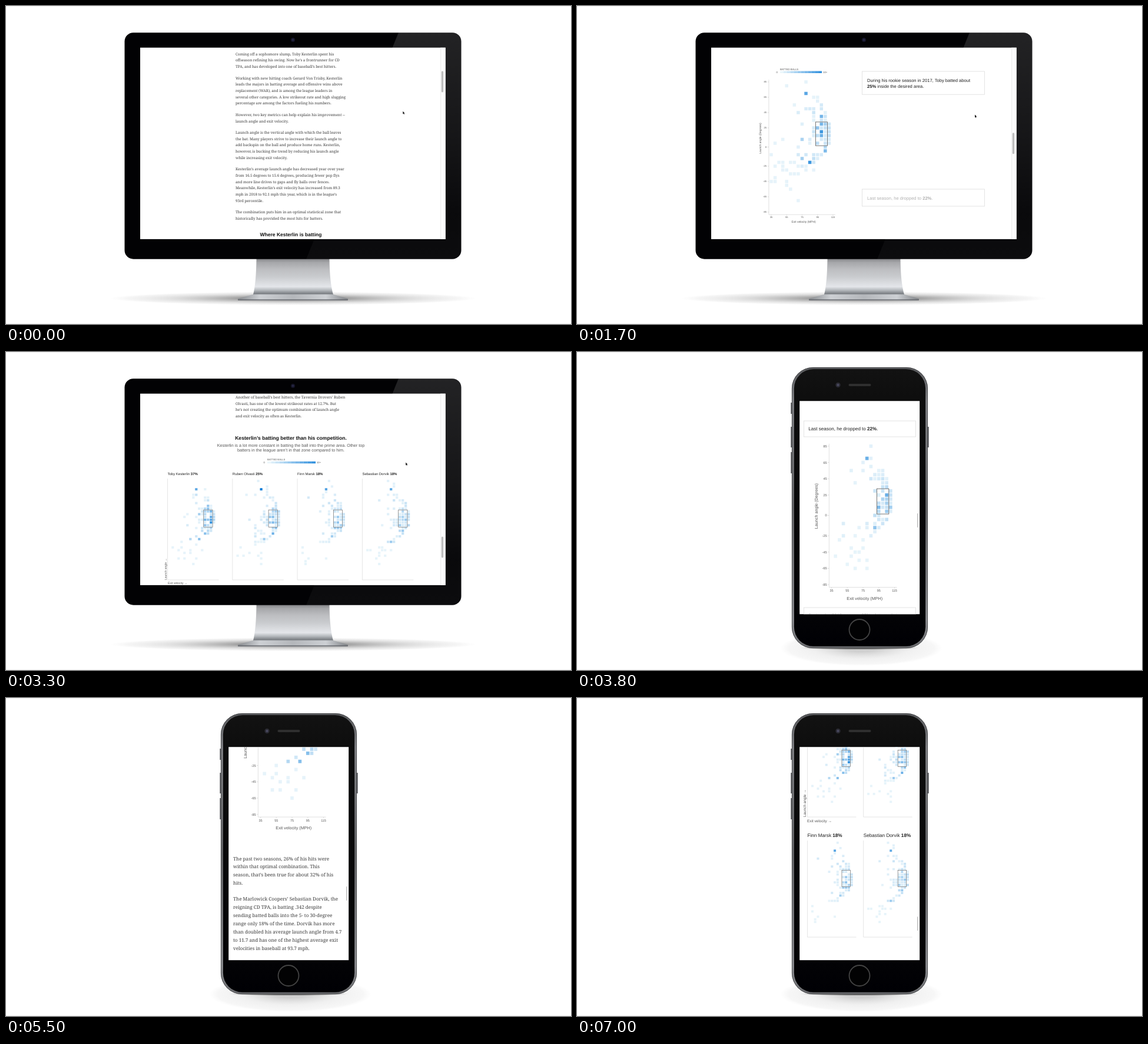
An HTML page for the animation above (7.1 s loop, 960 px wide and 540 px high).

```html
<!DOCTYPE html>
<html lang="en">
<head>
<meta charset="utf-8">
<title>Batting story</title>
<style>
  html, body { margin: 0; width: 100%; height: 100%; overflow: hidden; background: #fff; }
  svg { display: block; width: 960px; height: 540px; text-rendering: geometricPrecision; }
  text { font-family: "Liberation Sans", Arial, sans-serif; fill: #222; white-space: pre; }
  .serif { font-family: "Noto Serif", Georgia, serif; fill: #3a3a3a; }
  .soft { fill: #555; }
  .head { font-weight: 700; fill: #111; }
</style>
</head>
<body>
<svg id="stage" viewBox="0 0 960 540"></svg>
<script>
const LOOP = 7100, STEP = 100, CUT = 3600;

// ---------- helpers ----------
const clamp = v => Math.max(0, Math.min(1, v));
const range = (a, b) => Array.from({ length: b - a + 1 }, (_, i) => a + i);
const rng = seed => () => (seed = seed * 16807 % 2147483647) / 2147483647;

function at(keys, t) {
  let i = 1;
  while (i < keys.length - 1 && t > keys[i][0]) i++;
  const [t0, v0] = keys[i - 1], [t1, v1] = keys[i];
  return v0 + (v1 - v0) * clamp((t - t0) / (t1 - t0));
}

const bold = s => s.replace(/\*(.+?)\*/g, '<tspan font-weight="700">$1</tspan>');
const txt = (x, y, size, s, attr = '') =>
  `<text x="${x}" y="${y}" font-size="${size}" ${attr}>${bold(s)}</text>`;
const rect = (x, y, w, h, attr) =>
  `<rect x="${x}" y="${y}" width="${w}" height="${h}" ${attr}/>`;
const line = (x1, y1, x2, y2, color, w = .6) =>
  `<path d="M${x1} ${y1}L${x2} ${y2}" stroke="${color}" stroke-width="${w}"/>`;
const stops = list => list.map(([o, c, a = 1]) =>
  `<stop offset="${o}" stop-color="${c}" stop-opacity="${a}"/>`).join('');
const grad = (id, dir, list) => `<linearGradient id="${id}" ${dir}>${stops(list)}</linearGradient>`;
const radial = (id, list) => `<radialGradient id="${id}">${stops(list)}</radialGradient>`;

function paras(list, x, y, size, pitch, gap) {
  let out = '';
  for (const p of list) {
    for (const l of p) { out += txt(x, y, size, l, 'class="serif"'); y += pitch; }
    y += gap - pitch;
  }
  return out;
}

// ---------- batted ball data: [column, row, level] ----------
function makeData(seed, fill, far, hot) {
  const rand = rng(seed), map = {};
  const put = (c, r, v) => { map[c + ':' + r] = [c, r, v]; };
  for (const r of range(-5, 12)) {
    const edge = 15.6 - ((r - 3) / (r > 3 ? 5 : 3.6)) ** 2;
    for (const c of range(3, Math.floor(edge))) {
      const d = edge - c;
      const p = fill / (1 + Math.exp((d - 5 + Math.abs(r - 3) * .5) / 1.3)) + .03;
      const heat = Math.exp(-(((d - 2) / 2.2) ** 2) - ((r - 3) / 4.5) ** 2);
      const roll = rand(), lift = rand();
      if (roll < p) put(c, r, .03 + .13 * lift * lift + heat * (.08 + .38 * lift * lift));
    }
  }
  if (typeof far === 'number') {
    for (let i = 0; i < far; i++) {
      const r = -5 - Math.floor(rand() * 9);
      put(1 + Math.floor(rand() * 9), r, .02);
    }
    for (const r of range(11, 17)) if (rand() < .6) put(8 + Math.floor(rand() * 4), r, .05);
  } else far.forEach(([c, r]) => put(c, r, .03));
  hot.forEach(([c, r, v]) => put(c, r, v));
  return Object.values(map);
}

const rookie = makeData(4021, .92, [
  [9, 17], [4, 16], [11, 13], [12, 13], [6, 11], [1, -8], [0, -9], [1, -9], [4, -9], [4, -10],
  [5, -11], [7, -14], [1, -5], [2, -4], [3, -4], [3, -5], [3, -6], [4, -6], [5, -4], [5, -7],
  [6, -7], [7, -7], [9, -6], [11, -6], [6, -4], [7, -5], [1, 1], [3, 2], [0, -2]
], [[9, 14, .8], [13, 4, .95], [10, -4, .95], [13, 3, .7], [13, 8, .65], [14, -1, .6], [13, 6, .65], [8, -3, .4], [12, 5, .5], [8, 2, .35]]);
const second = makeData(977, .8, 16, [[9, 14, .7], [12, 2, .6], [14, 5, .7], [11, -3, .5]]);
const latest = makeData(6203, .85, [
  [1, -7], [4, -7], [3, -8], [7, -8], [11, -8], [5, -9], [7, -9], [3, -11], [5, -11], [9, -11],
  [8, -13], [9, -6], [12, 14], [8, 12], [8, 11], [5, 4], [6, 5]
], [[9, 14, .75], [9, 12, .2], [14, 2, 1], [14, 3, .8], [14, 4, .75], [14, 6, .65], [13, 7, .5], [13, 8, .5],
    [12, 3, .65], [12, -2, .55], [10, -4, .55], [7, -4, .3], [12, 1, .5], [10, 5, .4]]);
const players = [
  ['Toby Kesterlin *37%*', latest],
  ['Ruben Olvasti *25%*', makeData(31337, 1, 12, [[9, 14, 1.2], [13, -2, .7], [13, 2, .6], [14, 0, .5], [12, 4, .45], [10, -4, .45]])],
  ['Finn Marsk *18%*', makeData(8081, .9, 7, [[9, 14, .8], [11, -3, .4], [14, 1, .35]])],
  ['Sebastian Dorvik *18%*', makeData(5150, .9, 13, [[9, 14, .75], [13, -1, .45], [9, -5, .45], [14, 3, .45]])]
];

// ---------- charts ----------
const tint = v => {
  const a = [235, 246, 251], b = [52, 146, 222];
  return `rgb(${a.map((n, i) => Math.round(n + (b[i] - n) * v))})`;
};

const cells = (data, { x, y, px, py }) => data.map(([c, r, v]) =>
  rect((x + (c - .42) * px).toFixed(2), (y - (r + .42) * py).toFixed(2), (px * .84).toFixed(2),
    (py * .84).toFixed(2), `fill="${tint(v)}"`)).join('');

const zone = ({ x, y, px, py }, w) => rect(x + 11.5 * px, y - 6.55 * py, 3.05 * px, 6.2 * py,
  `fill="none" stroke="#555" stroke-width="${w}"`);

function legend(x, y, w, size) {
  const n = 12, bar = range(0, n - 1).map(i =>
    rect(x + i * w / n, y + 1.8, w / n + .1, 3.5, `fill="${tint(i / (n - 1))}"`)).join('');
  return txt(x, y, size, 'BATTED BALLS', 'class="soft"') + bar +
    txt(x - 6.5, y + 5, size, '0', 'class="soft"') + txt(x + w + 2, y + 5, size, '10+', 'class="soft"');
}

// The pinned chart, with one layer of cells per season
function mainChart(name, g, tick, title, turnX) {
  const { x, y, px, py } = g, left = x - .62 * px, base = y + 17.65 * py;
  let out = line(left, y - 17.6 * py, left, base, '#ccc') + line(left, base, x + 16.6 * px, base, '#ccc');
  for (const deg of [85, 65, 45, 25, 0, -25, -45, -65, -85]) {
    const ty = y - deg / 5 * py;
    out += line(left - 2.5, ty, left, ty, '#ccc') +
      txt(left - 3.8, ty + tick * .36, tick, String(deg), 'text-anchor="end" class="soft"');
  }
  for (const mph of [35, 55, 75, 95, 115]) {
    const tx = x + (mph - 35) / 5 * px;
    out += line(tx, base, tx, base + 2, '#ccc') +
      txt(tx, base + tick * 1.42, tick, String(mph), 'text-anchor="middle" class="soft"');
  }
  const mid = { x: x + 8.4 * px, y: y - 2.3 * py };
  out += txt(mid.x, base + title * 2.9, title, 'Exit velocity (MPH)', 'text-anchor="middle" class="soft"') +
    txt(0, 0, title, 'Launch angle (Degrees)',
      `text-anchor="middle" class="soft" transform="translate(${turnX} ${mid.y}) rotate(-90)"`);
  [rookie, second, latest].forEach((d, i) => { out += `<g id="${name}Data${i}">${cells(d, g)}</g>`; });
  return out + zone(g, .8);
}

function smallChart([label, data], x, top, k, size) {
  const g = { x: x + 3.8 * k, y: top + 83.9 * k, px: 5 * k, py: 4.7 * k }, low = top + 172 * k;
  return txt(x, top - 5.8, size, label) + line(x, top, x, low, '#d4d4d4') +
    line(x, low, x + 87 * k, low, '#d4d4d4') + cells(data, g) + zone(g, .6);
}

const arrows = (x, low, size) =>
  txt(x, low + size * 1.35, size, 'Exit velocity →', 'class="soft"') +
  txt(0, 0, size, 'Launch angle →', `class="soft" transform="translate(${x - 2.5} ${low}) rotate(-90)"`);

const stepBox = (id, s, o) =>
  rect(o.x, s.top, o.w, o.pad + o.pitch * s.lines.length, 'fill="#fff" stroke="#ddd" stroke-width=".8"') +
  `<g id="${id}">` + s.lines.map((l, i) =>
    txt(o.x + o.inset, s.top + o.first + i * o.pitch, o.size, l)).join('') + '</g>';

// ---------- page text ----------
const intro = [
  ['Coming off a sophomore slump, Toby Kesterlin spent his',
   'offseason refining his swing. Now he’s a frontrunner for CD',
   'TPA, and has developed into one of baseball’s best hitters.'],
  ['Working with new hitting coach Gerard Von Trisby, Kesterlin',
   'leads the majors in batting average and offensive wins above',
   'replacement (WAR), and is among the league leaders in',
   'several other categories. A low strikeout rate and high slugging',
   'percentage are among the factors fueling his numbers.'],
  ['However, two key metrics can help explain his improvement --',
   'launch angle and exit velocity.'],
  ['Launch angle is the vertical angle with which the ball leaves',
   'the bat. Many players strive to increase their launch angle to',
   'add backspin on the ball and produce home runs. Kesterlin,',
   'however, is bucking the trend by reducing his launch angle',
   'while increasing exit velocity.'],
  ['Kesterlin’s average launch angle has decreased year over year',
   'from 16.5 degrees to 15.6 degrees, producing fewer pop flys',
   'and more line drives to gaps and fly balls over fences.',
   'Meanwhile, Kesterlin’s exit velocity has increased from 89.3',
   'mph in 2018 to 92.1 mph this year, which is in the league’s',
   '93rd percentile.'],
  ['The combination puts him in an optimal statistical zone that',
   'historically has provided the most hits for batters.']
];
const wideText = [
  ['The past two seasons, 26% of his hits were within that optimal',
   'combination. This season, that’s been true for about 32% of',
   'his hits.'],
  ['The Marlowick Coopers’ Sebastian Dorvik, the reigning CD',
   'TPA, is batting .342 despite sending batted balls into the 5- to',
   '30-degree range only 18% of the time. Dorvik has more than',
   'doubled his average launch angle from 4.7 to 11.7 and has one',
   'of the highest average exit velocities in baseball at 93.7 mph.'],
  ['The Herons’ Finn Marsk is having another productive season,',
   'leading the Meridian League in metrics such as WAR (5.0),',
   'on-base percentage (.462), and slugging percentage (.651). But',
   'he hasn’t cracked the top 10 in batting average, and his lack of',
   'consistent launch angle could be a reason.'],
  ['Another of baseball’s best hitters, the Tavernia Drovers’ Ruben',
   'Olvasti, has one of the lowest strikeout rates at 12.7%. But',
   'he’s not creating the optimum combination of launch angle',
   'and exit velocity as often as Kesterlin.']
];
const narrowText = [
  ['The past two seasons, 26% of his hits were', 'within that optimal combination. This',
   'season, that’s been true for about 32% of his', 'hits.'],
  ['The Marlowick Coopers’ Sebastian Dorvik, the', 'reigning CD TPA, is batting .342 despite',
   'sending batted balls into the 5- to 30-degree', 'range only 18% of the time. Dorvik has more',
   'than doubled his average launch angle from 4.7', 'to 11.7 and has one of the highest average exit',
   'velocities in baseball at 93.7 mph.'],
  ['The Herons’ Finn Marsk is having another', 'productive season, leading the Meridian',
   'League in metrics such as WAR (5.0), on-base', 'percentage (.462), and slugging percentage',
   '(.651). But he hasn’t cracked the top 10 in', 'batting average, and his lack of consistent',
   'launch angle could be a reason.'],
  ['Another of baseball’s best hitters, the Tavernia', 'Drovers’ Ruben Olvasti, has one of the lowest',
   'strikeout rates at 12.7%. But he’s not creating', 'the optimum combination of launch angle and',
   'exit velocity as often as Kesterlin.']
];
const dropped = ['Last season, he dropped to *22%*.'];

// ---------- the two devices ----------
const wide = {
  name: 'wide', pin: 350, free: 1230, trigger: 205, thumb: [110.5, .1178], skip: 1,
  keys: [[0, 0], [900, 470], [1700, 890], [2500, 1369], [3300, 1723], [3600, 1800]],
  steps: [
    { top: 801, lines: ['The box marks the optimal combination of', 'launch angle and exit velocity.'] },
    { top: 1001, lines: ['During his rookie season in 2017, Toby batted about', '*25%* inside the desired area.'] },
    { top: 1201, lines: dropped },
    { top: 1391, lines: ['During the 2019 season, *37%* of Kesterlin’s batted', 'balls have produced the optimal combination of', 'launch angle and exit velocity.'] }
  ],
  box: { x: 484.5, w: 208, inset: 8.5, first: 17.6, pitch: 10.2, pad: 18.8, size: 7.6 }
};
const narrow = {
  name: 'narrow', pin: -1e4, free: 180, trigger: 245, thumb: [295, .0665], skip: -1,
  keys: [[3600, -400], [4000, -232], [4600, 0], [4800, 22], [5000, 65], [5600, 440], [6000, 645], [7000, 1145]],
  steps: [
    { top: -199, lines: dropped },
    { top: 118, lines: ['During the 2019 season, *37%* of Kesterlin’s', 'batted balls have produced the optimal', 'combination of launch angle and exit velocity.'] }
  ],
  box: { x: 385.5, w: 190, inset: 7.8, first: 16.3, pitch: 10.8, pad: 16.2, size: 8.05 }
};

const boxes = d => d.steps.map((s, i) => stepBox(d.name + 'Step' + i, s, d.box)).join('');
const center = 'text-anchor="middle"';

function widePage() {
  const y = 1723;
  return `<g id="wideChart">${legend(345, 108.7, 71, 4.3)}` +
    mainChart('wide', { x: 330, y: 239.5, px: 6.56, py: 6.5 }, 4.1, 4.9, 313) + '</g><g id="widePage">' +
    paras(intro, 390, 83.7, 6.25, 10.72, 19.4) +
    txt(484, 391.3, 8.5, 'Where Kesterlin is batting', center + ' class="head"') +
    boxes(wide) + paras(wideText, 390, 1369 + 267.5, 6.25, 10.72, 19.4) +
    txt(484, y + 148.6, 8.6, 'Kesterlin’s batting better than his competition.', center + ' class="head"') +
    txt(484, y + 160.6, 7.2, 'Kesterlin is a lot more constant in batting the ball into the prime area. Other top', center + ' class="soft"') +
    txt(484, y + 168.8, 7.2, 'batters in the league aren’t in that zone compared to him.', center + ' class="soft"') +
    legend(444, y + 184, 82, 4.2) +
    players.map((p, i) => smallChart(p, 274.5 + 110.3 * i, y + 215, 1, 6)).join('') +
    arrows(275, y + 387, 5) + '</g>';
}

function narrowPage() {
  const y = 645, low = 1145;
  const sub = ['Kesterlin is a lot more constant in batting', 'the ball into the prime area. Other top',
    'batters in the league aren’t in that zone', 'compared to him.'];
  return '<g id="narrowChart">' +
    mainChart('narrow', { x: 432.5, y: 277.5, px: 6.69, py: 6.92 }, 5.5, 7.2, 408.5) + '</g><g id="narrowPage">' +
    boxes(narrow) + paras(narrowText, 386, y + 8, 8.15, 13.97, 26.8) +
    txt(391, y + 409, 12.8, 'Kesterlin’s batting better', 'class="head"') +
    txt(391, y + 424, 12.8, 'than his competition.', 'class="head"') +
    sub.map((s, i) => txt(391, y + 441 + 11 * i, 9.75, s, 'class="soft"')).join('') +
    legend(400, y + 498, 90, 5.5) +
    players.map((p, i) => smallChart(p, i % 2 ? 486.7 : 391.5, low + (i < 2 ? 38 : 242), .954, 8.2)).join('') +
    arrows(391, low + 202, 6.4) + '</g>';
}

const down = 'x1="0" y1="0" x2="0" y2="1"';
const defs = `<defs>
  <clipPath id="wideClip"><rect x="228" y="70.7" width="518.7" height="325.2"/></clipPath>
  <clipPath id="narrowClip"><rect x="378.2" y="83.2" width="204" height="362"/></clipPath>
  <clipPath id="caseClip"><rect x="201.5" y="45.2" width="572" height="384.5" rx="15"/></clipPath>` +
  radial('shade', [[0, '#444', .9], [.35, '#777', .6], [.65, '#aaa', .38], [.9, '#ccc', .2], [1, '#ddd', 0]]) +
  radial('pale', [[.2, '#888', .4], [.6, '#bbb', .22], [.9, '#ccc', .16], [1, '#ddd', 0]]) +
  radial('touch', [[0, '#333', .9], [.7, '#555', .6], [1, '#999', 0]]) +
  grad('shine', down, [[0, '#fff', .13], [.45, '#fff', .08], [.8, '#fff', .03], [1, '#fff', .04]]) +
  grad('neck', down, [[0, '#808184'], [.1, '#a5a6a9'], [.3, '#bdbec1'], [.5, '#c9cbce'], [.78, '#e4e6ea'], [.88, '#b4b8bc'], [1, '#6c7075']]) +
  grad('foot', '', [[0, '#85888c'], [.2, '#cdd0d4'], [.5, '#b4b7bb'], [.8, '#cdd0d4'], [1, '#7f8286']]) +
  grad('rim', down, [[0, '#58595c'], [.12, '#838488'], [.5, '#66676a'], [.9, '#8e8f93'], [1, '#6a6b6e']]) +
  grad('face', down, [[0, '#121212'], [.1, '#0e0e0e'], [.85, '#040406'], [1, '#000004']]) + '</defs>';

const monitor = `<g id="wide">
  <ellipse cx="487.5" cy="496.5" rx="312" ry="11.5" fill="url(#shade)"/>
  <path d="M425.5 429H549.5Q550 470 556 490H420Q425 470 425.5 429Z" fill="url(#neck)"/>
  <path d="M421 489.5H555L581 497Q582 500 576 500H399Q393 500 394 497Z" fill="url(#foot)"/>
  <path d="M394 499H581" stroke="#66696e" stroke-width="1.6"/>
  <rect x="201.5" y="45.2" width="572" height="384.5" rx="15" fill="#020204"/>
  <path d="M667 45H774V430H510Z" fill="url(#shine)" clip-path="url(#caseClip)"/>
  <circle cx="487.5" cy="57.5" r="3.5" fill="#16162a"/><circle cx="487.5" cy="57.5" r="1.4" fill="#2c2c4c"/>
  <rect x="228" y="70.7" width="518.7" height="325.2" fill="#fff"/>
  <g clip-path="url(#wideClip)">${widePage()}
    <rect x="738.5" y="70" width="8.5" height="327" fill="#fcfcfc"/>${line(738.7, 70, 738.7, 397, '#e4e4e4', .8)}
    <rect id="wideThumb" x="739.8" width="3.3" height="36" rx="1.6" fill="#bdbdbd"/>
    <path id="cursor" d="M0 0V4.8L1.1 3.8L1.9 5.4L2.6 5L1.9 3.5H3.3Z" fill="#111"/>
  </g></g>`;

const phone = `<g id="narrow">
  <ellipse cx="483" cy="503" rx="138" ry="30" fill="url(#pale)"/>
  <ellipse cx="480.5" cy="502.5" rx="102" ry="3" fill="url(#touch)"/>
  <path d="M364.2 86V105M364.2 127V162M364.2 170V206M596.8 127V162" stroke="#55565a" stroke-width="1.8"/>
  <rect x="365" y="26" width="231" height="477" rx="36" fill="url(#rim)"/>
  <rect x="365.4" y="26.4" width="230.2" height="476.2" rx="35.6" fill="none" stroke="#3a3b3e" stroke-width=".8"/>
  <rect x="368.8" y="29" width="223.4" height="470.8" rx="33" fill="url(#face)"/>
  <circle cx="443.5" cy="56" r="4.2" fill="#2b2b33"/><circle cx="443.5" cy="56" r="2" fill="#4a4a62"/>
  <rect x="461.5" y="54" width="38" height="4" rx="2" fill="#2f2f2f"/>
  <circle cx="480" cy="471.5" r="17.5" fill="#020203" stroke="#444" stroke-width="1.8"/>
  <rect x="378.2" y="83.2" width="204" height="362" fill="#fff"/>
  <g clip-path="url(#narrowClip)">${narrowPage()}
    <rect id="narrowThumb" x="578" width="1.7" height="24" rx=".8" fill="#c4c4c4"/>
  </g></g>`;

document.getElementById('stage').innerHTML = defs + rect(0, 0, 960, 540, 'fill="#fff"') +
  monitor + phone + line(0, .5, 960, .5, '#f3f3f3', 1) + line(0, 539.5, 960, 539.5, '#f3f3f3', 1);

// ---------- motion ----------
const el = id => document.getElementById(id);
const shift = (id, x, y) => el(id).setAttribute('transform', `translate(${x} ${y})`);
const pointX = [[0, 674.3], [1700, 676], [2500, 677.8], [3300, 679.2]];
const pointY = [[0, 178.8], [1700, 184.6], [2500, 187.4], [3300, 187.6]];

function drawDevice(d, t) {
  const s = at(d.keys, t);
  shift(d.name + 'Page', 0, -s);
  shift(d.name + 'Chart', 0, Math.max(0, d.pin - s) - Math.max(0, s - d.free));
  el(d.name + 'Thumb').setAttribute('y', d.thumb[0] + s * d.thumb[1]);
  const fade = d.steps.map(p => clamp((s - p.top + d.trigger) / 90));
  const on = i => i < 0 ? 0 : fade[i] * (1 - (fade[i + 1] || 0));
  d.steps.forEach((_, i) => el(d.name + 'Step' + i).setAttribute('opacity', .35 + .65 * on(i)));
  for (const k of range(0, 2)) el(d.name + 'Data' + k).setAttribute('opacity', on(k + d.skip));
}

function draw(t) {
  const onWide = t < CUT;
  el('wide').style.display = onWide ? '' : 'none';
  el('narrow').style.display = onWide ? 'none' : '';
  drawDevice(onWide ? wide : narrow, t);
  shift('cursor', at(pointX, t), at(pointY, t));
}

const start = performance.now();
function tick() {
  const t = (performance.now() - start) % LOOP;
  draw(Math.floor(t / STEP) * STEP);
  requestAnimationFrame(tick);
}
tick();
</script>
</body>
</html>
```
